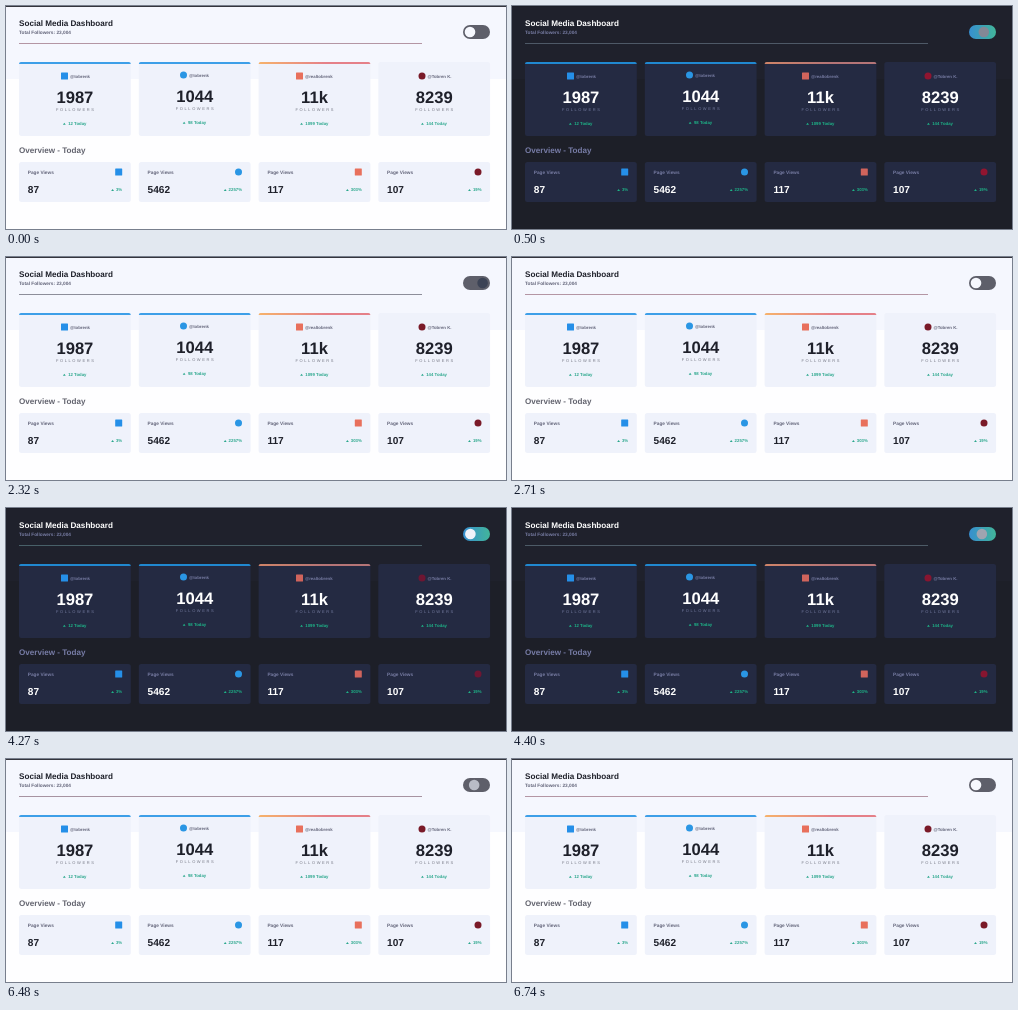
Animation of 500 by 223 pixels, one loop 8000 ms. Source, as an HTML page:

```html
<!DOCTYPE html>
<html lang="en">
<head>
<meta charset="utf-8">
<title>Social Media Dashboard</title>
<style>
  html, body { margin: 0; height: 100%; overflow: hidden; }
  svg {
    display: block; width: 100%; height: 100%;
    --page: #fefeff; --header: #f5f7fe; --edge: #34353d; --card: #eff2fb;
    --title: #1e202a; --muted: #63646f; --sub: #63657a; --small: #777986; --up: #2aa78c;
    --blue: #3d9fe8; --warm: #f6b26b; --pink: #e58088; --photo: #e8705c;
  }
  svg.dark {
    --page: #1d1f28; --header: #1f212c; --edge: #1b1d26; --card: #242a42;
    --title: #fff; --muted: #777ca6; --sub: #787da4; --small: #747b9f; --up: #1eb488;
    --blue: #2088d0; --warm: #cf8468; --pink: #b57577; --photo: #d0645c;
  }
  text { font-family: "Liberation Sans", Arial, sans-serif; font-weight: bold; text-rendering: geometricPrecision; }
</style>
</head>
<body>
<svg id="stage" viewBox="0 0 500 223">
  <defs>
    <linearGradient id="warmBar"><stop stop-color="var(--warm)"/><stop offset=".6" stop-color="var(--pink)"/></linearGradient>
    <linearGradient id="darkToggle"><stop stop-color="#378fd0"/><stop offset="1" stop-color="#42b59a"/></linearGradient>
  </defs>
  <rect width="500" height="223" fill="var(--page)"/>
  <rect width="500" height="73" fill="var(--header)"/>
  <rect width="500" height="1" fill="var(--edge)"/>
  <g id="content"></g>
  <rect id="rule" x="13" y="37" width="403" height="1"/>
  <rect id="track" x="457" y="19" width="27" height="14" rx="7"/>
  <circle id="knob" cy="26" r="5.3"/>
</svg>
<script>
const stage = document.getElementById('stage');
const [content, rule, track, knob] =
  ['content', 'rule', 'track', 'knob'].map(id => document.getElementById(id));

const accounts = [
  { x: 13, dy: 0, handle: '@tobrenk', handleX: 64, count: '1987', today: '12', views: '87', rise: '3%',
    bar: 'var(--blue)', color: '#258fe8', round: false },
  { x: 132.8, dy: -1, handle: '@tobrenk', handleX: 183, count: '1044', today: '98', views: '5462', rise: '2257%',
    bar: 'var(--blue)', color: '#2a96e4', round: true },
  { x: 252.6, dy: 0, handle: '@realtobrenk', handleX: 299, count: '11k', today: '1099', views: '117', rise: '303%',
    bar: 'url(#warmBar)', color: 'var(--photo)', round: false },
  { x: 372.3, dy: 0, handle: '@Tobren K.', handleX: 421.5, count: '8239', today: '144', views: '107', rise: '19%',
    bar: 'none', color: 'var(--video)', round: true },
];

const text = (x, y, size, color, value, extra = '') =>
  `<text x="${x}" y="${y}" font-size="${size}" fill="var(--${color})" ${extra}>${value}</text>`;
const centered = 'text-anchor="middle"';
const icon = (x, y, { color, round }) =>
  `<rect x="${x - 3.5}" y="${y - 3.5}" width="7" height="7" rx="${round ? 3.5 : .5}" fill="${color}"/>`;
const arrow = (x, y) => `<path d="M${x} ${y}l1.4 -2l1.4 2z" fill="var(--up)"/>`;
// Approximate bold text width, used to seat the arrow before its label.
const labelWidth = (digits, rest) => (digits * .556 + rest) * 4.3;

function accountCards(a) {
  const middle = a.x + 55.9, right = a.x + 103.2;
  const todayWidth = labelWidth(a.today.length, 3.15);
  const riseWidth = labelWidth(a.rise.length - 1, .889);
  return `
    <rect x="${a.x}" y="56" width="111.8" height="74" rx="2.5" fill="var(--card)"/>
    <path d="M${a.x} 58q0 -2 2 -2h107.8q2 0 2 2z" fill="${a.bar}"/>
    <g transform="translate(0 ${a.dy})">
      ${icon(a.handleX - 5.5, 70, a)}
      ${text(a.handleX, 71.5, 4.3, 'sub', a.handle)}
      ${text(middle, 97.2, 16.6, 'title', a.count, centered)}
      ${text(middle + .8, 105, 4, 'small', 'FOLLOWERS', centered + ' letter-spacing="1.6" style="font-weight:normal"')}
      ${arrow(middle - todayWidth / 2 - 2.8, 118.7)}
      ${text(middle + 2.4, 119, 4.3, 'up', a.today + ' Today', centered)}
    </g>
    <rect x="${a.x}" y="156" width="111.8" height="40" rx="2.5" fill="var(--card)"/>
    ${text(a.x + 8.8, 167.8, 4.75, 'sub', 'Page Views')}
    ${icon(a.x + 99.7, 166, a)}
    ${text(a.x + 8.8, 187.3, 10.1, 'title', a.views)}
    ${arrow(right - riseWidth - 4.8, 185)}
    ${text(right, 185.4, 4.3, 'up', a.rise, 'text-anchor="end"')}`;
}

content.innerHTML =
  text(13, 19.9, 8.15, 'title', 'Social Media Dashboard') +
  text(13, 27.8, 4.75, 'sub', 'Total Followers: 23,004') +
  text(13, 147, 8.1, 'muted', 'Overview - Today') +
  accounts.map(accountCards).join('');

// The theme flips at once; the knob follows in held steps of 130 ms.
const LOOP = 8000, STEP = 130;
const switches = [
  { at: 0, dark: false, travel: [1] },
  { at: 500, dark: true, travel: [.6, .92, 1] },
  { at: 2320, dark: false, travel: [.03, .45, .88, 1] },
  { at: 4270, dark: true, travel: [.03, .45, .88, 1] },
  { at: 6480, dark: false, travel: [.68, .94, 1] },
];

const mix = (from, to, p) => `rgb(${from.map((v, i) => Math.round(v + (to[i] - v) * p))})`;

function draw(time) {
  const { at, dark, travel } = switches.findLast(s => s.at <= time);
  const done = travel[Math.min(Math.floor((time - at) / STEP), travel.length - 1)];
  const p = dark ? done : 1 - done;
  stage.classList.toggle('dark', dark);
  stage.style.setProperty('--video', dark ? mix([108, 22, 50], [168, 20, 46], p) : '#7a1a28');
  rule.setAttribute('fill', dark
    ? mix([72, 96, 104], [82, 85, 102], p)
    : mix([180, 150, 164], [140, 142, 154], p));
  track.setAttribute('fill', dark ? 'url(#darkToggle)' : '#5e5f6a');
  knob.setAttribute('cx', 464 + 13 * p);
  knob.setAttribute('fill', mix([246, 248, 254], [54, 61, 80], p));
}

function frame() {
  draw(performance.now() % LOOP);
  requestAnimationFrame(frame);
}
frame();
</script>
</body>
</html>
```
